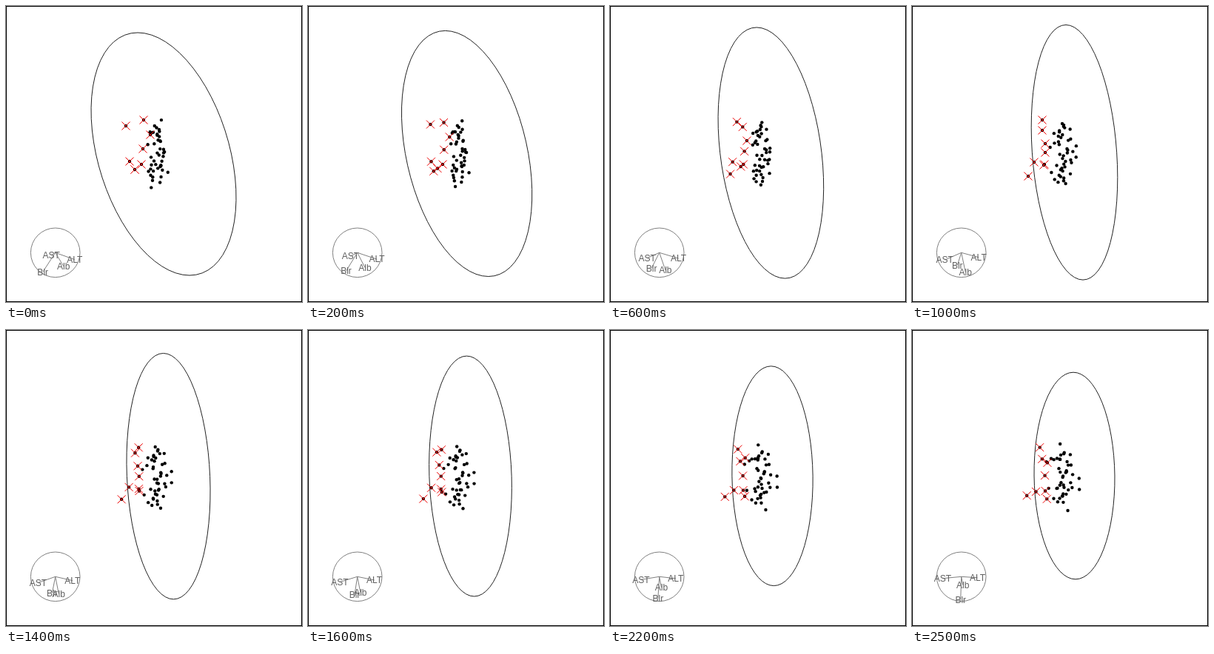
Recreate the animation shown at these times as an HTML page with a canvas. Size 400x400 px, loop 2600 ms.

```html
<!DOCTYPE html>
<html lang="en">
<head>
<meta charset="utf-8">
<title>Data tour</title>
<style>
  html, body { margin: 0; width: 100%; height: 100%; overflow: hidden; background: #fff; }
  canvas { display: block; width: 400px; height: 400px; }
</style>
</head>
<body>
<canvas id="stage" width="400" height="400"></canvas>
<script>
const ctx = document.getElementById('stage').getContext('2d');
const STEP = 100, STEPS = 26, TURN = 10, LAST = 25;
const MID = 200, RADIUS = 33.4;

// The tour passes three views: first, turn, last.
const names = ['AST', 'ALT', 'Alb', 'Blr'];
const axesX = [[-5.5, 26, 11, -17], [-22.5, 23.5, 5.5, -5.5], [-25.5, 22, 2, -1]];
const axesY = [[3.5, 9.5, 18.5, 26.5], [10, 6.5, 26.5, 17.5], [2.5, 1.5, 11.5, 32.5]];
const hull = {
  x: [213, 219.5, 219.5], y: [200, 197.8, 197],
  w: [98, 58.3, 54.5], h: [164, 172.3, 139.8], lean: [35, 11.5, 1.5]
};

// A data point has its place at the turn and its shift up to then: x, y, dx, dy.
const outliers = [
  [176, 154, 14, -8], [176, 168, -10, 14], [180, 186, -15, 12], [180, 198, -5, 5],
  [165, 211, -2, 1], [179, 214, -4, 0], [178, 215, 4, -6], [157, 230, -17, 9]
];

let seed = 7;
function random() {
  seed = (seed * 16807) % 2147483647;
  return seed / 2147483647;
}
const spread = () => random() + random() - 1;

// Evenly stacked in y, widest in the middle, drifting up as they drift right
const COUNT = 44;
const dots = Array.from({ length: COUNT }, (_, i) => {
  const u = (i + 0.5) / COUNT;
  const off = 24 * spread() * (0.5 + 0.5 * Math.sin(Math.PI * u));
  const dx = 0.4 * off + 13 * spread();
  return [204 + off, 158 + 83 * u, dx, 4 * spread() - 0.55 * dx];
});

const mix = (a, b, u) => a + (b - a) * u;

// Stage of the tour: leg, linear progress u, and eased progress across and down
function stageAt(step) {
  if (step <= TURN) {
    const u = step / TURN, eased = u * (1.3 - 0.3 * u);
    return { leg: 0, u, across: eased, down: eased };
  }
  const u = (step - TURN) / (LAST - TURN);
  return { leg: 1, u, across: u * (2 - u), down: u * (0.6 + 0.4 * u) };
}

// The last view is a linear combination of the first two.
function place([x, y, dx, dy], { leg, across, down }) {
  if (leg === 0) return [x - dx * (1 - across), y - dy * (1 - down)];
  const px = x - MID, py = y - MID;
  const endX = -0.09 * px + 0.2 * dx - 0.25 * dy;
  const endY = -0.295 * px - 0.095 * py + 0.34 * dx - 1.15 * dy;
  return [x + endX * across, y + endY * down];
}

// Blend two views of the axes and restore their length
function axisParts(views, { leg, u }) {
  const parts = views[leg].map((a, i) => mix(a, views[leg + 1][i], u));
  const scale = RADIUS / Math.hypot(...parts);
  return parts.map(p => p * scale);
}

function line(x1, y1, x2, y2) {
  ctx.beginPath();
  ctx.moveTo(x1, y1);
  ctx.lineTo(x2, y2);
  ctx.stroke();
}

function circle(x, y, r) {
  ctx.beginPath();
  ctx.arc(x, y, r, 0, 2 * Math.PI);
}

function drawDot(x, y) {
  ctx.fillStyle = '#000';
  circle(x, y, 2.2);
  ctx.fill();
}

function drawCross(x, y) {
  const r = 5.5;
  ctx.strokeStyle = '#e00';
  line(x - r, y - r, x + r, y + r);
  line(x - r, y + r, x + r, y - r);
}

function drawHull(stage) {
  const get = (key, pace) => mix(hull[key][stage.leg], hull[key][stage.leg + 1], pace);
  const w = get('w', stage.across), lean = get('lean', stage.across);
  ctx.save();
  ctx.transform(Math.sqrt(w * w - lean * lean), 0, lean, get('h', stage.down),
    get('x', stage.across), get('y', stage.down));
  circle(0, 0, 1);
  ctx.restore();
  ctx.strokeStyle = '#222';
  ctx.stroke();
}

function drawAxes(stage) {
  const cx = 66.7, cy = 333.3;
  const xs = axisParts(axesX, stage), ys = axisParts(axesY, stage);
  ctx.strokeStyle = '#808080';
  circle(cx, cy, 33.3);
  ctx.stroke();
  ctx.fillStyle = '#606060';
  ctx.font = '12px "Liberation Sans", Arial, sans-serif';
  ctx.textAlign = 'center';
  names.forEach((name, i) => {
    const x = cx + xs[i], y = cy + ys[i];
    line(cx, cy, x, y);
    ctx.fillText(name, x, y + 4.2);
  });
}

function draw(step) {
  const stage = stageAt(step);
  ctx.fillStyle = '#fff';
  ctx.fillRect(0, 0, 400, 400);
  ctx.lineWidth = 1;
  ctx.strokeStyle = '#000';
  ctx.strokeRect(0.5, 0.5, 399, 399);
  drawHull(stage);
  for (const d of dots) drawDot(...place(d, stage));
  for (const d of outliers) {
    const spot = place(d, stage);
    drawDot(...spot);
    drawCross(...spot);
  }
  drawAxes(stage);
}

const start = performance.now();
function tick() {
  draw(Math.floor((performance.now() - start) / STEP) % STEPS);
  requestAnimationFrame(tick);
}
tick();
</script>
</body>
</html>
```
